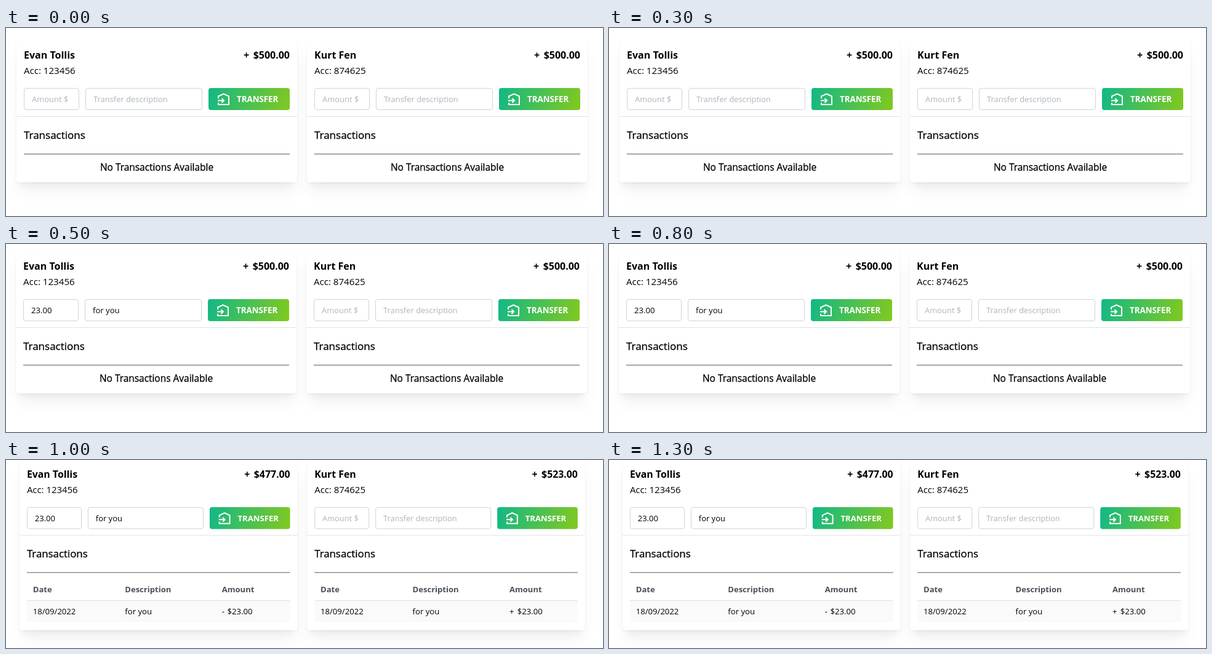
An HTML page for the animation above (1.5 s loop, 970 by 307 pixels).

```html
<!DOCTYPE html>
<html lang="en">
<head>
<meta charset="utf-8">
<title>Transfer between accounts</title>
<style>
  html, body { margin: 0; width: 100%; height: 100%; overflow: hidden; background: #fff; }
  svg { display: block; width: 970px; height: 307px; }
  text { font-family: "Open Sans", "Noto Sans", sans-serif; fill: #000; white-space: pre; }
  .bold { font-size: 16px; font-weight: 700; }
  .acc { font-size: 15.1px; }
  .title { font-size: 17px; stroke: #000; stroke-width: .3px; }
  .empty { font-size: 15.45px; stroke: #000; stroke-width: .3px; }
  .field { font-size: 13.1px; }
  .hint { font-size: 12.95px; fill: #adb5bd; }
  .btn { font-size: 13.3px; font-weight: 700; fill: #fff; }
  .head { font-size: 13.2px; font-weight: 700; fill: #495057; }
  .cell { font-size: 13.25px; }
  .end { text-anchor: end; }
  .mid { text-anchor: middle; }
  .box { fill: #fff; stroke: #ced4da; }
  .icon { fill: none; stroke: #fff; stroke-width: 2; }
</style>
</head>
<body>
<svg viewBox="0 0 970 307" xmlns="http://www.w3.org/2000/svg">
  <defs>
    <linearGradient id="lime" gradientUnits="userSpaceOnUse" x1="311.9" y1="78.3" x2="444.1" y2="113.7">
      <stop offset="0" stop-color="#12b886"/>
      <stop offset="1" stop-color="#82c91e"/>
    </linearGradient>
    <filter id="far" x="-20%" y="-30%" width="140%" height="160%"><feGaussianBlur stdDeviation="12.5"/></filter>
    <filter id="near" x="-20%" y="-30%" width="140%" height="160%"><feGaussianBlur stdDeviation="5"/></filter>
    <filter id="rim" x="-20%" y="-30%" width="140%" height="160%"><feGaussianBlur stdDeviation="1.5"/></filter>
  </defs>
  <g id="stage"></g>
</svg>
<script>
const STEP = 500;
const WIDTH = 456;
const stage = document.getElementById('stage');

const people = [
  { name: 'Evan Tollis', acc: '123456', sign: '-', after: '477.00', cashX: 341 },
  { name: 'Kurt Fen', acc: '874625', sign: '+', after: '523.00', cashX: 345 }
];

const views = [
  { x: [17, 489], y: 20, scale: 1, typed: false, done: false },
  { x: [16, 488], y: 12, scale: 1, typed: true, done: false },
  { x: [22, 489.3], y: -0.2, scale: 0.99, typed: true, done: true }
];

const text = (x, y, cls, str) => `<text x="${x}" y="${y}" class="${cls}">${str}</text>`;
const rect = (x, y, w, h, attrs) => `<rect x="${x}" y="${y}" width="${w}" height="${h}" ${attrs}/>`;
const shade = (inset, dy, h, alpha, blur) =>
  rect(inset, inset + dy, WIDTH - 2 * inset, h - 2 * inset,
    `rx="4" fill-opacity="${alpha}" filter="url(#${blur})"`);

function panel(h) {
  return shade(5, 20, h, 0.05, 'far') + shade(5, 10, h, 0.04, 'near') +
    shade(0, 1, h, 0.05, 'rim') + rect(0, 0, WIDTH, h, 'rx="4" fill="#fff"');
}

function field(x, w, hint, value) {
  return rect(x + 0.5, 78.5, w - 1, 35, 'rx="3.5" class="box"') +
    text(x + 13, 101, value ? 'field' : 'hint', value || hint);
}

function button() {
  return rect(312, 78, 132, 36, 'rx="4" fill="url(#lime)"') +
    '<path class="icon" d="M328 95V91.5L336.5 87.5L345 91.5V105H328V102M327 98.5H337M333.5 95L337 98.5L333.5 102"/>' +
    text(358, 101, 'btn', 'TRANSFER');
}

function table(p) {
  const cols = [22, 173, 332];
  const heads = ['Date', 'Description', 'Amount'];
  const cells = ['18/09/2022', 'for you', p.sign];
  return rect(12, 232, 432, 36, 'fill="#fafafa"') +
    rect(12, 231.5, 432, 1, 'fill="#dee2e6"') +
    cols.map((x, i) => text(x, 218.5, 'head', heads[i]) + text(x, 255, 'cell', cells[i])).join('') +
    text(p.cashX, 255, 'cell', '$23.00');
}

function card(p, i, view) {
  const typed = view.typed && i === 0;
  return `<g transform="translate(${view.x[i]} ${view.y}) scale(${view.scale})">` +
    panel(view.done ? 281 : 232) +
    text(12, 30, 'bold', p.name) +
    text(369, 30, 'bold', view.done ? p.sign.replace('-', '+') : '+') +
    text(444, 30, 'bold end', '$' + (view.done ? p.after : '500.00')) +
    text(12, 55, 'acc', 'Acc: ' + p.acc) +
    field(12, 90, 'Amount $', typed && '23.00') +
    field(112, 190, 'Transfer description', typed && 'for you') +
    button() +
    rect(0, 124, WIDTH, 1, 'fill="#dee2e6"') +
    text(12, 161, 'title', 'Transactions') +
    rect(12, 185, 432, 1, 'fill="#8c8c8c"') +
    rect(12, 186, 432, 1, 'fill="#c4c4c4"') +
    (view.done ? table(p) : text(228, 213, 'empty mid', 'No Transactions Available')) +
    '</g>';
}

const scenes = views.map(v => people.map((p, i) => card(p, i, v)).join(''));
let shown = -1;

function draw(ms) {
  const k = Math.floor(ms / STEP) % scenes.length;
  if (k !== shown) stage.innerHTML = scenes[shown = k];
}

const start = performance.now();
function tick() {
  draw(performance.now() - start);
  requestAnimationFrame(tick);
}
tick();
</script>
</body>
</html>
```
